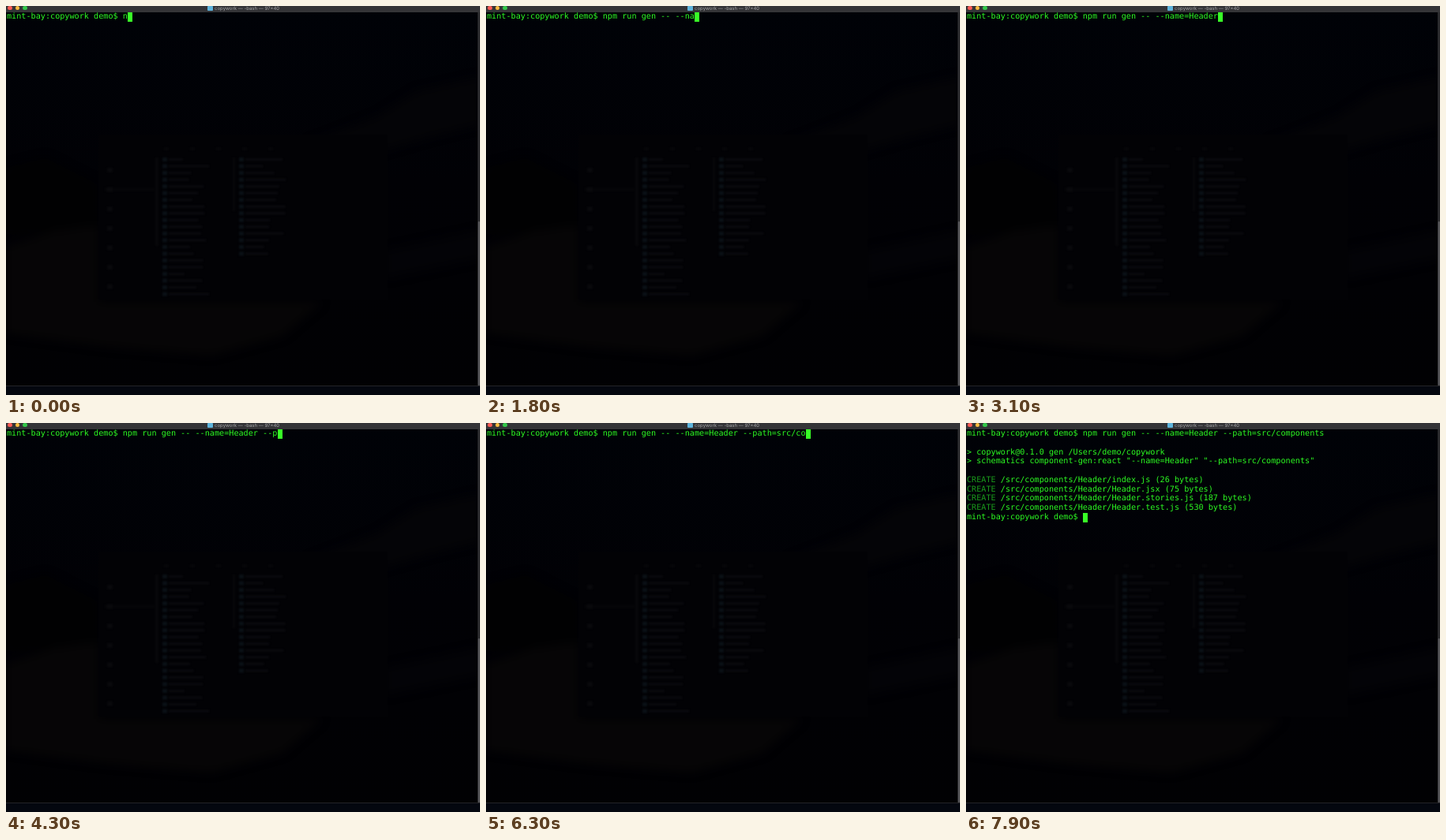
An HTML page for the animation above (8000 ms loop, 600 by 493 pixels).

```html
<!DOCTYPE html>
<html lang="en">
<head>
<meta charset="utf-8">
<title>Terminal</title>
<style>
  html, body { margin: 0; width: 100%; height: 100%; overflow: hidden; background: #000; }
  #stage { position: relative; width: 600px; height: 493px; overflow: hidden; background: #010104; text-rendering: geometricPrecision; }
  #stage > * { position: absolute; }
  #desk { left: 0; top: 0; }
  #bar { left: 0; top: 0; width: 600px; height: 7.5px; background: #343437; overflow: hidden; }
  #bar > * { position: absolute; }
  .light { top: -.3px; width: 5.7px; height: 5.7px; border-radius: 50%; }
  #busy { left: 4px; top: 1.5px; width: 2.2px; height: 2.2px; border-radius: 50%; background: #7a0c08; }
  #icon { top: 0; width: 7.5px; height: 6px; border-radius: 1px; background: #5fb4dc; }
  #title { top: 0; color: #a9a9ab; font: 6px/7.5px Inter, Roboto, sans-serif; white-space: pre; }
  #bar.running #icon { background: #3a6d84; }
  #screen { left: 1px; top: 8px; color: #2cfb22; font: 10.17px/11.75px "DejaVu Sans Mono", monospace; }
  #screen div { position: absolute; left: 0; white-space: pre; }
  #screen b { font-weight: normal; color: #1a9c1c; }
  #cursor { width: 6.1px; height: 11.75px; background: #38fe27; }
</style>
</head>
<body>
<div id="stage">
  <svg id="desk" width="600" height="493" color-interpolation-filters="sRGB">
    <defs>
      <linearGradient id="sky" x2="0" y2="1">
        <stop offset="0" stop-color="#000207"/>
        <stop offset=".45" stop-color="#010105"/>
        <stop offset="1" stop-color="#010103"/>
      </linearGradient>
      <filter id="soft"><feGaussianBlur stdDeviation="6"/></filter>
      <filter id="haze"><feGaussianBlur stdDeviation="1"/></filter>
    </defs>
    <rect width="600" height="493" fill="url(#sky)"/>
    <g filter="url(#soft)">
      <path d="M380 175L470 140 520 108 600 90V150L540 165 470 185Z" fill="#040407"/>
      <path d="M0 205L50 192 115 225V280L0 290Z" fill="#010102"/>
      <path d="M0 305L60 285 118 278V375H400L350 418 260 443 130 432 0 415Z" fill="#060506"/>
      <path d="M480 310L600 285V320L480 345Z" fill="#030307"/>
    </g>
    <rect x="117" y="163" width="366" height="209" fill="#020205"/>
    <g id="ghost" filter="url(#haze)"></g>
    <rect y="481" width="600" height="1" fill="#242427"/>
    <rect y="482" width="600" height="11" fill="#04070f"/>
    <rect x="597" y="8" width="3" height="473" fill="#2b2b2e"/>
    <rect x="597.5" y="273" width="2.5" height="208" rx="1" fill="#555558"/>
  </svg>
  <div id="bar">
    <i class="light" style="left:2.2px;background:#fc5b57"></i>
    <i class="light" style="left:11.7px;background:#fdbc40"></i>
    <i class="light" style="left:21.2px;background:#34c84a"></i>
    <i id="busy"></i><i id="icon"></i><span id="title"></span>
  </div>
  <div id="screen"><div id="cursor"></div></div>
</div>
<script>
const $ = id => document.getElementById(id);
const LOOP = 8000, STEP = 100, CELL = 6.123, ROW = 11.75;
const PROMPT = 'mint-bay:copywork demo$ ';
const COMMAND = 'npm run gen -- --name=Header --path=src/components';
const IDLE = 'copywork — -bash — 97×40';
const RUNNING = 'copywork — npm TERM_PROGRAM=Apple_Terminal ANDROID_HOME=/Users/demo/Library/Android/sdk ' +
  'NVM_CD_FLAGS= TERM=xterm-256color SHELL=/bin/bash TMPDIR=/var/folders/3c/23m8_dtn18…';

// Typing bursts: first key, last key, text reached
const BURSTS = [
  [100, 500, 'npm run '],
  [800, 1000, 'npm run gen '],
  [1400, 1800, 'npm run gen -- --na'],
  [1900, 3100, 'npm run gen -- --name=Header'],
  [3200, 3600, 'npm run gen -- --name=Header --'],
  [4100, 4700, 'npm run gen -- --name=Header --pat'],
  [5100, 6300, 'npm run gen -- --name=Header --path=src/co'],
  [6400, 6900, COMMAND]
];
const ENTER = 7000, TITLE_ON = 7100, HEADER = 7400, CREATED = 7600, DONE = 7700, CALM = 7800;

const created = (file, size) => `<b>CREATE</b> /src/components/Header/${file} (${size} bytes)`;

// [time, row, markup]
const OUTPUT = [
  [HEADER, 2, '&gt; copywork@0.1.0 gen /Users/demo/copywork'],
  [HEADER, 3, '&gt; schematics component-gen:react "--name=Header" "--path=src/components"'],
  [CREATED, 5, created('index.js', 26)],
  [CREATED, 6, created('Header.jsx', 75)],
  [CREATED, 7, created('Header.stories.js', 187)],
  [CREATED, 8, created('Header.test.js', 530)],
  [DONE, 9, PROMPT]
];

function addLine(row, html) {
  const el = document.createElement('div');
  el.style.top = row * ROW + 'px';
  el.innerHTML = html;
  $('screen').append(el);
  return el;
}

const command = addLine(0, '');
const lines = OUTPUT.map(([at, row, html]) => ({ at, el: addLine(row, html) }));

// Faint file browser behind the terminal
function drawGhost() {
  let out = '', seed = 7;
  const random = () => (seed = seed * 16807 % 2147483647) / 2147483647;
  const box = (x, y, w, h, fill) => out += `<rect x="${x}" y="${y}" width="${w}" height="${h}" fill="${fill}"/>`;
  const list = (x, rows) => {
    for (let i = 0; i < rows; i++) {
      const y = 192 + i * 8.53;
      box(x, y, 6, 5, '#0a1016');
      box(x + 8, y + 1, 18 + 36 * random(), 3, '#0a0a0e');
    }
  };
  list(198, 21);
  list(295, 15);
  box(189, 192, 4, 112, '#08080b');
  box(287, 192, 3, 68, '#07070a');
  box(125, 230, 63, 5, '#050508');
  for (let y = 208; y < 360; y += 24.6) box(128, y - 3, 7, 6, '#09090c');
  for (let x = 203; x < 340; x += 33) box(x - 3, 179, 6, 4, '#07070a');
  $('ghost').innerHTML = out;
}

function typedAt(t) {
  let count = 1;
  for (const [first, last, text] of BURSTS) {
    if (t < first) break;
    const keys = (last - first) / STEP + 1;
    const hit = Math.min(keys, Math.floor((t - first) / STEP) + 1);
    count += Math.round((text.length - count) * hit / keys);
  }
  return count;
}

function render(t) {
  const typed = typedAt(t);
  command.textContent = PROMPT + COMMAND.slice(0, typed);
  for (const { at, el } of lines) el.style.visibility = t >= at ? 'visible' : 'hidden';

  let col = PROMPT.length + typed, row = 0;
  if (t >= ENTER) [col, row] = [0, 1];
  if (t >= HEADER) row = 5;
  if (t >= CREATED) row = 9;
  if (t >= DONE) col = PROMPT.length;
  $('cursor').style.left = col * CELL + 'px';
  $('cursor').style.top = row * ROW + 'px';

  const running = t >= TITLE_ON && t < DONE, left = running ? 31.5 : 254.8;
  $('bar').classList.toggle('running', running);
  $('title').textContent = running ? RUNNING : IDLE;
  $('icon').style.left = left + 'px';
  $('title').style.left = left + 9.3 + 'px';
  $('busy').style.visibility = t >= TITLE_ON && t < CALM ? 'visible' : 'hidden';
}

drawGhost();
const start = performance.now();
function tick() {
  render((performance.now() - start) % LOOP);
  requestAnimationFrame(tick);
}
tick();
</script>
</body>
</html>
```
